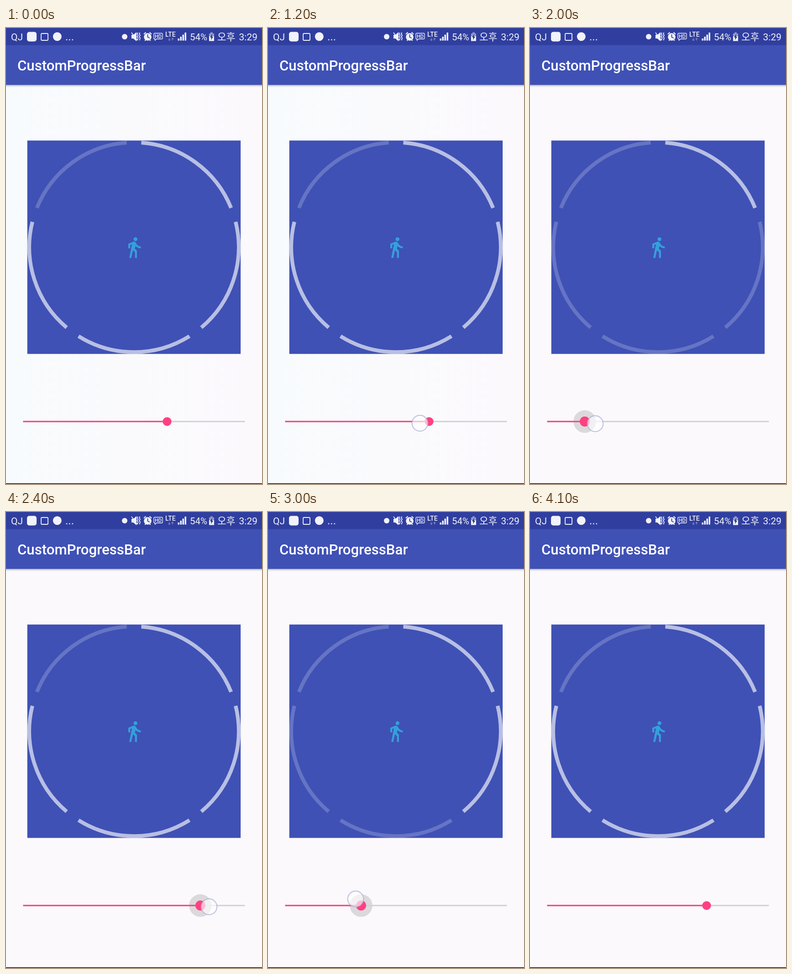
An HTML page for the animation above (4200 ms loop, 561 by 998 pixels).

```html
<!DOCTYPE html>
<html lang="ko">
<head>
<meta charset="utf-8">
<title>CustomProgressBar</title>
<style>
  html, body { margin: 0; width: 100%; height: 100%; overflow: hidden; background: #fbf9fc; }
  svg { display: block; width: 100%; height: 100%; }
  text { font-family: Roboto, "Noto Sans CJK KR", "Noto Sans CJK", sans-serif; fill: #fff; white-space: pre; }
  .status text { fill: #f1f2fa; }
</style>
</head>
<body>
<svg viewBox="0 0 561 998" preserveAspectRatio="none">
  <defs>
    <linearGradient id="tint">
      <stop offset="0" stop-color="#f8fbfd"/>
      <stop offset="1" stop-color="#fcf9fd"/>
    </linearGradient>
    <linearGradient id="shade" x2="0" y2="1">
      <stop offset="0" stop-color="#000" stop-opacity=".32"/>
      <stop offset=".4" stop-color="#000" stop-opacity=".13"/>
      <stop offset="1" stop-color="#000" stop-opacity="0"/>
    </linearGradient>
  </defs>

  <rect width="561" height="998" fill="#fbf9fc"/>
  <rect id="wash" width="561" height="998" fill="url(#tint)"/>
  <rect y="996.5" width="561" height="1.5" fill="#111"/>

  <rect y="124" width="561" height="6" fill="url(#shade)"/>
  <rect y="37" width="561" height="87.5" fill="#3f51b5"/>
  <rect width="561" height="37.5" fill="#303f9f"/>
  <text x="25" y="93" font-size="31.17" font-weight="500">CustomProgressBar</text>

  <g class="status" fill="#f1f2fa">
    <text x="11" y="27" font-size="21">QJ</text>
    <rect x="46" y="8.5" width="21" height="21" rx="5"/>
    <rect x="77" y="12" width="15" height="15" rx="2" fill="none" stroke="#f1f2fa" stroke-width="1.8"/>
    <circle cx="112.3" cy="18.8" r="9.5"/>
    <text x="130" y="27" font-size="24">...</text>

    <circle cx="260" cy="19" r="6"/>

    <!-- muted, vibrating -->
    <path d="M275 15h4l7-6v20l-7-6h-4z"/>
    <g fill="none" stroke="#f1f2fa" stroke-width="1.7">
      <path d="M275 10l13 17M289 10l-1.5 3 2 3-2 3 2 3-1.5 5M293.5 10l-1.5 3 2 3-2 3 2 3-1.5 5"/>
    </g>

    <!-- alarm -->
    <circle cx="310.5" cy="19.5" r="8.3"/>
    <path d="M302 13.5l4.5-4M319 13.5l-4.5-4M304.5 28l2-3M316.5 28l-2-3" stroke="#f1f2fa" stroke-width="2.2"/>
    <path d="M310.5 14v6l4.5 2" fill="none" stroke="#303f9f" stroke-width="1.8"/>

    <!-- HD call -->
    <path d="M326 11.5h15q2 0 2 2v8.500q0 2-2 2h-11l-3.500 3v-3h-.5q-2 0-2-2v-8.500q0-2 2-2z" fill="none" stroke="#f1f2fa" stroke-width="1.3"/>
    <text x="326" y="22" font-size="11" font-weight="500">HD</text>

    <text x="349" y="19" font-size="14" font-weight="500">LTE</text>
    <path d="M358 22v5M356 25l2 2.500 2-2.500M365 27.500v-5M363 24.500l2-2.500 2 2.500" fill="none" stroke="#7c87c6" stroke-width="1.3"/>
    <path d="M376.500 23h3.500v4.500h-3.500zM381.500 19h3.500v8.500h-3.500zM386.500 14.500h3.500v13h-3.500zM391.500 10h3.500v17.500h-3.500z"/>

    <text x="403" y="27" font-size="20.500">54%</text>

    <!-- charging battery -->
    <path d="M448 9.500h5v2.500h3v7h-11v-7h3z" opacity=".5"/>
    <path d="M445 18h11v10.500h-11z"/>
    <path d="M452 13l-5 7.500h3l-1 6 5-7.500h-3z" fill="#1d2763"/>

    <text x="463" y="27" font-size="21.500">오후</text>
    <text x="510.500" y="27" font-size="21">3:29</text>
  </g>

  <rect x="46.7" y="246.300" width="467.500" height="467" fill="#3f51b5"/>
  <g id="ring" fill="none" stroke="#fff" stroke-width="8.200"></g>
  <path fill="#369fdb" transform="translate(255.400 454.900) scale(2.100)"
    d="M13.500 5.500c1.100 0 2-.9 2-2s-.9-2-2-2-2 .9-2 2 .9 2 2 2zM9.800 8.900L7 23h2.100l1.800-8 2.100 2v6h2v-7.500l-2.100-2 .6-3C14.800 12 16.800 13 19 13v-2c-1.900 0-3.500-1-4.300-2.400l-1-1.600c-.4-.6-1-1-1.700-1-.3 0-.5.1-.8.1L6 8.300V13h2V9.600l1.800-.7z"/>

  <circle id="halo" cy="861.300" r="24.800" fill="#000" fill-opacity=".13"/>
  <path d="M37.500 861.300H523.500" stroke="#d0d2d6" stroke-width="3"/>
  <path id="fill" stroke="#ff4081" stroke-width="3"/>
  <circle id="thumb" cy="861.300" fill="#ff4081"/>
  <circle id="touch" r="17.300" fill="#fff" fill-opacity=".65" stroke="#a9aed3" stroke-opacity=".7" stroke-width="2.200"/>
</svg>

<script>
const LOOP = 4200, STEP = 100;
const LEFT = 37.5, RIGHT = 523.5;
const PARTS = 5;
const PRESS = 1300, RELEASE = 3500;
const LIFT = 3600;

// time, thumb x, touch x, touch y
const path = [
  [1200, 353, 333, 865],
  [1300, 333, 318, 865],
  [1500, 255, 215, 866],
  [1700, 150, 115, 866],
  [1900, 104, 112, 866],
  [2000, 120, 143, 866],
  [2400, 426, 445, 864],
  [2500, 446, 464, 860],
  [2700, 344, 294, 843],
  [2900, 222, 194, 845],
  [3000, 204, 192, 847],
  [3300, 344, 354, 853],
  [3400, 387, 394, 857],
  [4200, 387, 394, 857]
];

const byId = id => document.getElementById(id);
const [wash, ring, halo, fill, thumb, touch] =
  ["wash", "ring", "halo", "fill", "thumb", "touch"].map(byId);

function set(el, attrs) {
  for (const key in attrs) el.setAttribute(key, attrs[key]);
}

function show(el, on) {
  el.setAttribute("visibility", on ? "visible" : "hidden");
}

function ringPoint(deg) {
  const a = deg * Math.PI / 180, r = 229.5;
  return `${280.5 + r * Math.sin(a)} ${479.8 - r * Math.cos(a)}`;
}

const arcs = Array.from({ length: PARTS }, (_, i) => {
  const arc = document.createElementNS("http://www.w3.org/2000/svg", "path");
  const from = i * 360 / PARTS + 4;
  set(arc, { d: `M${ringPoint(from)}A229.5 229.5 0 0 1 ${ringPoint(from + 64)}` });
  return ring.appendChild(arc);
});

function pose(t) {
  const next = path.findIndex(key => key[0] > t);
  if (next === 0) return path[0].slice(1);
  const a = path[next - 1], b = path[next];
  const k = (t - a[0]) / (b[0] - a[0]);
  return a.slice(1).map((v, i) => v + (b[i + 1] - v) * k);
}

function draw(t) {
  const [x, touchX, touchY] = pose(t);
  const pressed = t >= PRESS && t < RELEASE;
  const lit = Math.ceil((x - LEFT) / (RIGHT - LEFT) * PARTS);

  show(wash, t < PRESS);
  show(halo, pressed);
  show(touch, t >= 1200 && t < LIFT);
  arcs.forEach((arc, i) => set(arc, { "stroke-opacity": i < lit ? 0.63 : 0.2 }));
  set(halo, { cx: x });
  set(fill, { d: `M${LEFT} 861.3H${x}` });
  set(thumb, { cx: x, r: pressed ? 11 : 9.6 });
  set(touch, { cx: touchX, cy: touchY });
}

const start = performance.now();
function tick() {
  const t = (performance.now() - start) % LOOP;
  draw(Math.floor(t / STEP) * STEP);
  requestAnimationFrame(tick);
}
tick();
</script>
</body>
</html>
```
